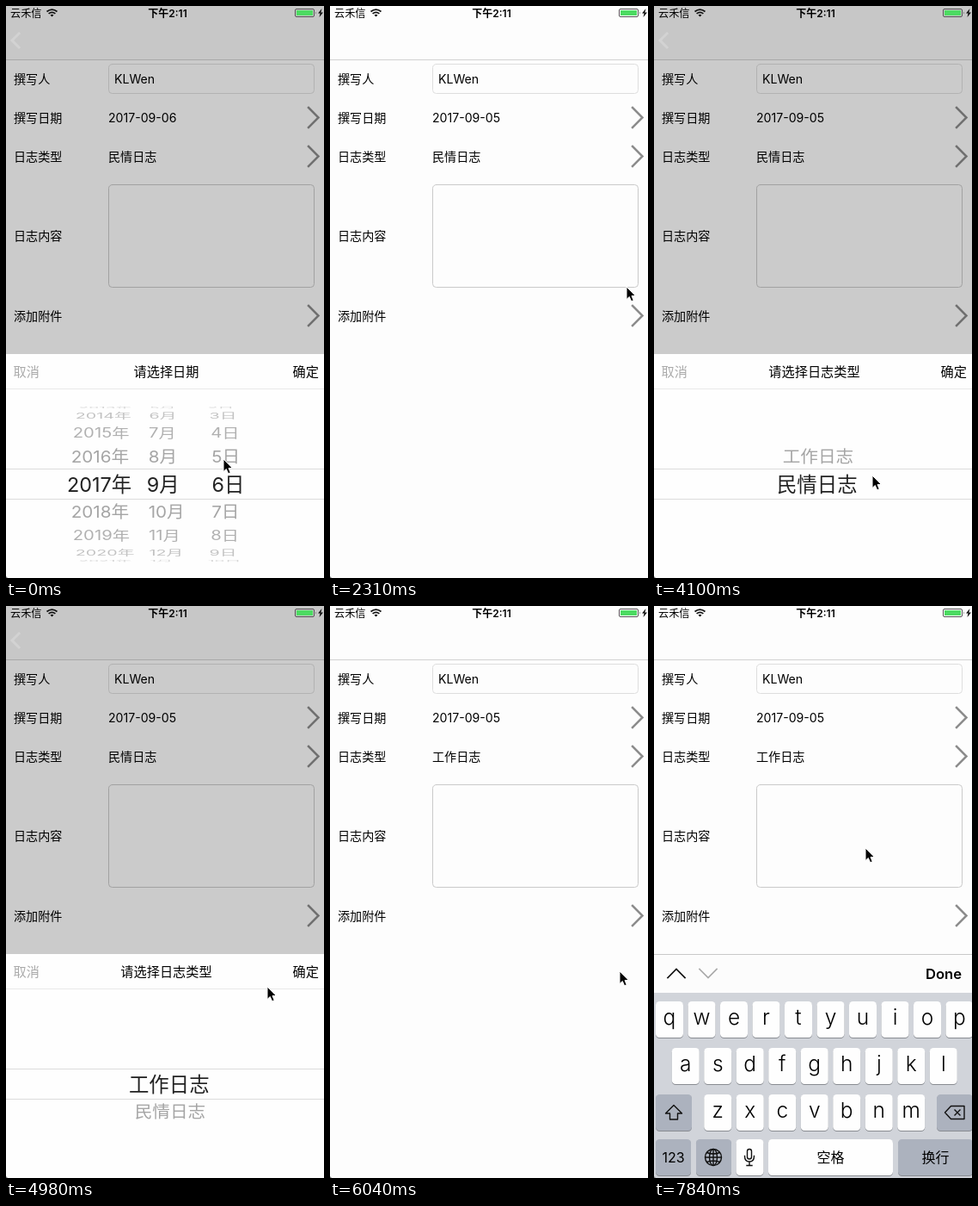
Write an HTML page that moves like this. It is 370x664 px and loops after 8000 ms.

```html
<!DOCTYPE html>
<html lang="zh-CN">
<head>
<meta charset="utf-8">
<style>
html, body { margin: 0; width: 100%; height: 100%; overflow: hidden; background: #fdfdfd; }
svg { display: block; font-family: Inter, "Noto Sans CJK SC", "Noto Sans CJK", sans-serif; font-size: 14.1px; }
.line { fill: none; stroke-linecap: square; }
.head { font-size: 15.2px; }
.key { font-size: 16px; text-anchor: middle; }
.letter { font-size: 24.5px; font-weight: 300; text-anchor: middle; }
.row { font-size: 20.8px; fill: #999; }
.picked { font-size: 23.4px; fill: #222; }
</style>
</head>
<body>
<svg width="370" height="664" viewBox="0 0 370 664">
  <rect width="370" height="664" fill="#fdfdfd"/>
  <path d="M0 62.5H370" stroke="#d2d2d2"/>
  <g class="line" stroke="#dedede">
    <rect x="119.5" y="67.5" width="239" height="34" rx="4"/>
    <rect x="119.5" y="207.5" width="239" height="119" rx="4" stroke="#cacaca"/>
  </g>
  <g id="form"></g>
  <rect id="caret" x="123" y="214" width="2" height="18.5" fill="#4468dc"/>

  <g id="dim">
    <rect width="370" height="664" opacity=".2"/>
    <rect width="370" height="62" opacity=".02"/>
    <path class="line" d="M15 32l-8 8 8 8" stroke="#d3d3d3" stroke-width="3"/>
  </g>

  <g id="sheet">
    <rect width="370" height="270" fill="#fefefe"/>
    <path d="M0 40.5H370" stroke="#e9e9e9"/>
    <g class="head">
      <text x="8.5" y="26" fill="#aaa">取消</text>
      <text id="title" x="186.5" y="26" text-anchor="middle"></text>
      <text x="333.5" y="26">确定</text>
    </g>
    <g id="rows" class="row"></g>
    <rect y="133" width="370" height="36" fill="#fefefe"/>
    <svg y="134" width="370" height="34" viewBox="0 134 370 34"><g id="picked" class="picked"></g></svg>
    <path d="M0 133.5H370M0 168.5H370" stroke="#dcdcdc"/>
  </g>

  <g id="board">
    <rect width="370" height="45" fill="#fcfcfc"/>
    <path d="M0 .5H370" stroke="#c9c9c9"/>
    <path class="line" d="M16 27.5l10-10 10 10" stroke="#111" stroke-width="1.7"/>
    <path class="line" d="M53 17.5l10 10 10-10" stroke="#aaa" stroke-width="1.7"/>
    <text x="316" y="29" font-size="16.6" font-weight="600">Done</text>
    <rect y="45" width="370" height="215" fill="#d1d4da"/>
    <g id="keys"></g>
    <g class="line" stroke="#111" stroke-width="1.4" stroke-linejoin="round">
      <path d="M23 175.5l-9.5 9.5h5v7h9v-7h5z"/>
      <path d="M338.5 184l7-7.5H361v15H345.5zM350 181l6 6m0-6l-6 6"/>
      <circle cx="69" cy="236" r="9.5"/>
      <ellipse cx="69" cy="236" rx="4.5" ry="9.5"/>
      <path d="M69 227v18M60 236h18M61.500 230.500q7.500 3 15 0m0 11q-7.500-3-15 0"/>
      <rect x="108.500" y="226.500" width="5" height="11.500" rx="2.500"/>
      <path d="M105.500 234.500q0 6.500 5.500 6.500t5.500-6.500M111 241v4M108 245.500h6"/>
    </g>
  </g>
  <path d="M0 662l2 2H0z" fill="#777"/>

  <text x="5" y="12.5" font-size="12.2">云禾信</text>
  <path fill="none" stroke="#111" stroke-width="1.7" d="M47.500 6.500q6-4.600 12 0M49.600 8.900q3.900-3 7.800 0"/>
  <path d="M51.500 10.600q2-1.600 4 0l-2 2z" fill="#111"/>
  <text x="188" y="12.5" font-size="12" font-weight="600" text-anchor="middle">下午2:11</text>
  <rect x="336.500" y="3.500" width="22" height="9" rx="1.500" fill="none" stroke="#555"/>
  <rect x="338" y="5" width="19" height="6" fill="#4cdb62"/>
  <path d="M360 6.500q1.500 1.500 0 3z" fill="#555"/>
  <path d="M367.500 3L363 8.600h2.500l-1 4.400L369 7.400h-2.600z" fill="#111"/>

  <path id="mouse" d="M0 0V14.500L3.300 11.500 5.600 16.800 8.200 15.700 6 10.500H10.500z" stroke="#fff"/>
</svg>
<script>
const $ = id => document.getElementById(id);
const LOOP = 8000, STEP = 178, SLIDE = 178;
const TYPES = ['工作日志', '民情日志'];

// Pointer legs: start ms, end ms, x, y
const legs = [
  [0, 0, 253, 526],
  [200, 700, 253, 558],
  [890, 1240, 338, 417],
  [1960, 2840, 357, 161],
  [3210, 3920, 254, 545],
  [4110, 4620, 254, 579],
  [4620, 4980, 304, 442],
  [4990, 5340, 337, 424],
  [6050, 6930, 246, 281]
];

function ease(t, start, end) {
  const f = Math.max(0, Math.min(1, (t - start) / (end - start || 1)));
  return f * f * (3 - 2 * f);
}

const pointer = t => legs.reduce(([x, y], [start, end, toX, toY]) => {
  const f = start === end ? 1 : ease(t, start, end);
  return [x + (toX - x) * f, y + (toY - y) * f];
}, [0, 0]);

// Rows sit on a cylinder; the band in the middle shows them enlarged.
function wheel(cols) {
  let rows = '', picked = '';
  for (const { x, pos, label, anchor = 'start' } of cols) {
    const text = (px, y, attrs, s) => `<text text-anchor="${anchor}" x="${px}" y="${y}" ${attrs}>${s}</text>`;
    for (let k = Math.ceil(pos - 4.3); k <= pos + 4.3; k++) {
      const s = label(k), d = k - pos;
      if (!s) continue;
      const a = d * .36, c = Math.cos(a), p = .9 + .1 * c;
      if (c > .03) rows += text(x - 185, 7.7, `opacity="${.3 + .62 * c}"
        transform="translate(185 ${151 + 90 * Math.sin(a)}) scale(${p} ${p * c})"`, s);
      if (Math.abs(d) < 1) picked += text(x + (x - 240) / 40, 159.7 + 36 * d, '', s);
    }
  }
  $('rows').innerHTML = rows;
  $('picked').innerHTML = picked;
}

function buildForm() {
  const label = (y, s) => `<text x="9" y="${y + 5}">${s}</text>`;
  const value = (x, y, s, id) => `<text id="${id}" x="${x}" y="${y + 5}">${s}</text>`;
  const arrow = y => `<path class="line" d="M352 ${y - 11.5}l11.5 11.5-11.5 11.5" stroke="#8c8c8c" stroke-width="2.5"/>`;
  $('form').innerHTML =
    label(85, '撰写人') + value(126, 85, 'KLWen', 'author') +
    label(130, '撰写日期') + value(119, 129.5, '', 'date') + arrow(129.5) +
    label(175, '日志类型') + value(119, 175, '', 'type') + arrow(174.5) +
    label(267, '日志内容') +
    label(360, '添加附件') + arrow(359.5);
}

function key(x, y, w, text, grey, cls = 'key') {
  const box = (dy, fill) => `<rect x="${x}" y="${y + dy}" width="${w}" height="42" rx="4.5" fill="${fill}"/>`;
  return box(1, '#898c92') + box(0, grey ? '#acb2be' : '#fefefe') +
    `<text class="${cls}" x="${x + w / 2}" y="${y + 27}">${text}</text>`;
}

function buildKeys() {
  const letters = ['qwertyuiop', 'asdfghjkl', 'zxcvbnm'].map((row, r) =>
    [...row].map((c, i) =>
      key(189.5 + 37.5 * (i - row.length / 2), 55 + 54 * r, 32, c, false, 'letter')).join(''));
  $('keys').innerHTML = letters.join('') +
    key(2, 163, 42, '', true) + key(329, 163, 42, '', true) +
    key(2, 215, 41, '123', true) + key(49, 215, 41, '', true) +
    key(95.5, 215, 32, '') + key(133, 215, 145, '空格') + key(284, 215, 87, '换行', true);
}

const move = (id, x, y) => $(id).setAttribute('transform', `translate(${Math.round(x)} ${Math.round(y)})`);
const show = (id, o) => $(id).setAttribute('opacity', o);

function draw(t) {
  const slide = start => ease(t, start, start + SLIDE);
  const hidden = slide(1602) - slide(3039) + slide(5737.5);
  const picksDate = t < 2500;
  $('date').textContent = t < 1600 ? '2017-09-06' : '2017-09-05';
  $('type').textContent = TYPES[t < 5800 ? 1 : 0];
  $('title').textContent = picksDate ? '请选择日期' : '请选择日志类型';
  show('dim', hidden < 1 ? 1 : 0);
  show('caret', t < 7100 ? 0 : 1 - ease(t, 7470, 7830));
  move('sheet', 0, 404 + 260 * hidden);
  move('board', 0, 664 - 260 * ease(t, 7061, 7361));
  move('mouse', ...pointer(t));
  wheel(picksDate ? [
    { x: 75, pos: 2017, label: k => k + '年' },
    { x: 165.5, pos: 9, label: k => (k + 11) % 12 + 1 + '月' },
    { x: 239.5, pos: 6 - ease(t, 200, 1000), label: k => (k + 29) % 30 + 1 + '日' }
  ] : [{ x: 191, pos: 1 - ease(t, 4110, 4780), label: k => TYPES[k], anchor: 'middle' }]);
}

// The screen refreshes in even steps, about 5.6 per second.
let last = -1;
const start = performance.now();
function tick() {
  const t = (performance.now() - start) % LOOP;
  const n = Math.min(44, Math.floor((t + 14) / STEP));
  if (n !== last) draw((last = n) * STEP);
  requestAnimationFrame(tick);
}
buildForm();
buildKeys();
tick();
</script>
</body>
</html>
```
